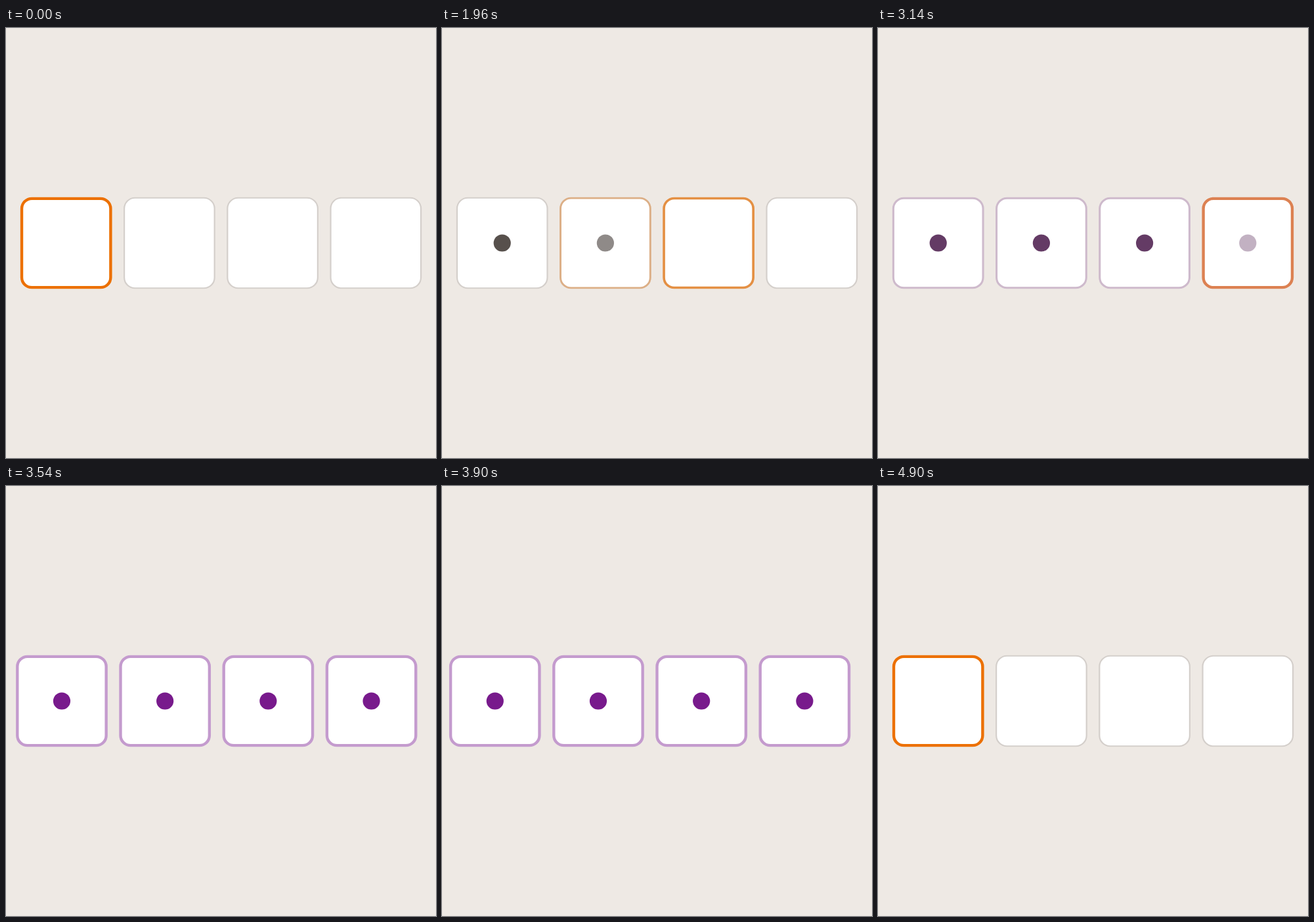
These frames come from a looping animation (655x655 px, 5.24 s). An HTML page:

```html
<!DOCTYPE html>
<html lang="en">
<head>
<meta charset="utf-8">
<title>Passcode entry</title>
<style>
  html, body { margin: 0; height: 100%; overflow: hidden; background: #eee9e4; }
  svg { display: block; width: 100vw; height: 100vh; }
</style>
</head>
<body>
<svg viewBox="0 0 150 150"><g id="row"></g></svg>
<script>
const LOOP = 5240, CELLS = 4, PITCH = 36, SIZE = 32, RADIUS = 4;
const ORANGE = [236, 112, 0], GRAY = [212, 207, 203], DARK = [87, 80, 76];
const PURPLE = [120, 26, 140], LILAC = [196, 155, 206];
const TYPE_START = 1214, TYPE_STEP = 620, TYPE_TIME = 300;
const SHAKE_START = 3522, SHAKE_STEP = 80, SHAKE_LEGS = 9, SWING = 2.5;
const RESET_START = 4842, QUICK = 50;

const row = document.getElementById('row');
const add = (name, attrs) => {
  const el = document.createElementNS('http://www.w3.org/2000/svg', name);
  set(el, attrs);
  return row.appendChild(el);
};
const set = (el, attrs) => {
  for (const key in attrs) el.setAttribute(key, attrs[key]);
};
const cells = Array.from({ length: CELLS }, (_, i) => ({
  box: add('rect', { fill: '#fff' }),
  dot: add('circle', { cx: 21 + i * PITCH, cy: 75, r: 3 })
}));

// Ease-out progress of a move that begins at start
const progress = (t, start, duration) => {
  const p = Math.min(1, Math.max(0, (t - start) / duration));
  return 1 - (1 - p) ** 2;
};
const mix = (a, b, p) => a + (b - a) * p;
const mixColor = (a, b, p) => `rgb(${a.map((v, i) => mix(v, b[i], p))})`;

// Look of cell i after `typed` digits; the last digit turns the row purple
function look(typed, i) {
  if (typed === CELLS) return { border: LILAC, width: 1, color: PURPLE, alpha: 1 };
  const active = i === typed;
  return {
    border: active ? ORANGE : GRAY,
    width: active ? 1 : 0.5,
    color: DARK,
    alpha: i < typed ? 1 : 0
  };
}

function currentMove(t) {
  if (t >= RESET_START) return [CELLS, 0, progress(t, RESET_START, QUICK)];
  const n = Math.min(CELLS - 1, Math.max(0, Math.floor((t - TYPE_START) / TYPE_STEP)));
  return [n, n + 1, progress(t, TYPE_START + n * TYPE_STEP, TYPE_TIME)];
}

function shakeOffset(t) {
  const leg = Math.floor((t - SHAKE_START) / SHAKE_STEP);
  if (leg < 0 || leg >= SHAKE_LEGS) return 0;
  const side = leg % 2 ? SWING : -SWING;
  const from = leg === 0 ? 0 : -side;
  const to = leg === SHAKE_LEGS - 1 ? 0 : side;
  return mix(from, to, progress(t, SHAKE_START + leg * SHAKE_STEP, QUICK));
}

function draw(t) {
  const [from, to, p] = currentMove(t);
  cells.forEach(({ box, dot }, i) => {
    const a = look(from, i), b = look(to, i);
    const width = mix(a.width, b.width, p), inset = width / 2;
    set(box, {
      x: 5 + i * PITCH + inset, y: 59 + inset,
      width: SIZE - width, height: SIZE - width, rx: RADIUS - inset,
      stroke: mixColor(a.border, b.border, p), 'stroke-width': width
    });
    set(dot, { fill: mixColor(a.color, b.color, p), opacity: mix(a.alpha, b.alpha, p) });
  });
  set(row, { transform: `translate(${shakeOffset(t)} 0)` });
}

const begin = performance.now();
function tick() {
  draw((performance.now() - begin) % LOOP);
  requestAnimationFrame(tick);
}
tick();
</script>
</body>
</html>
```
